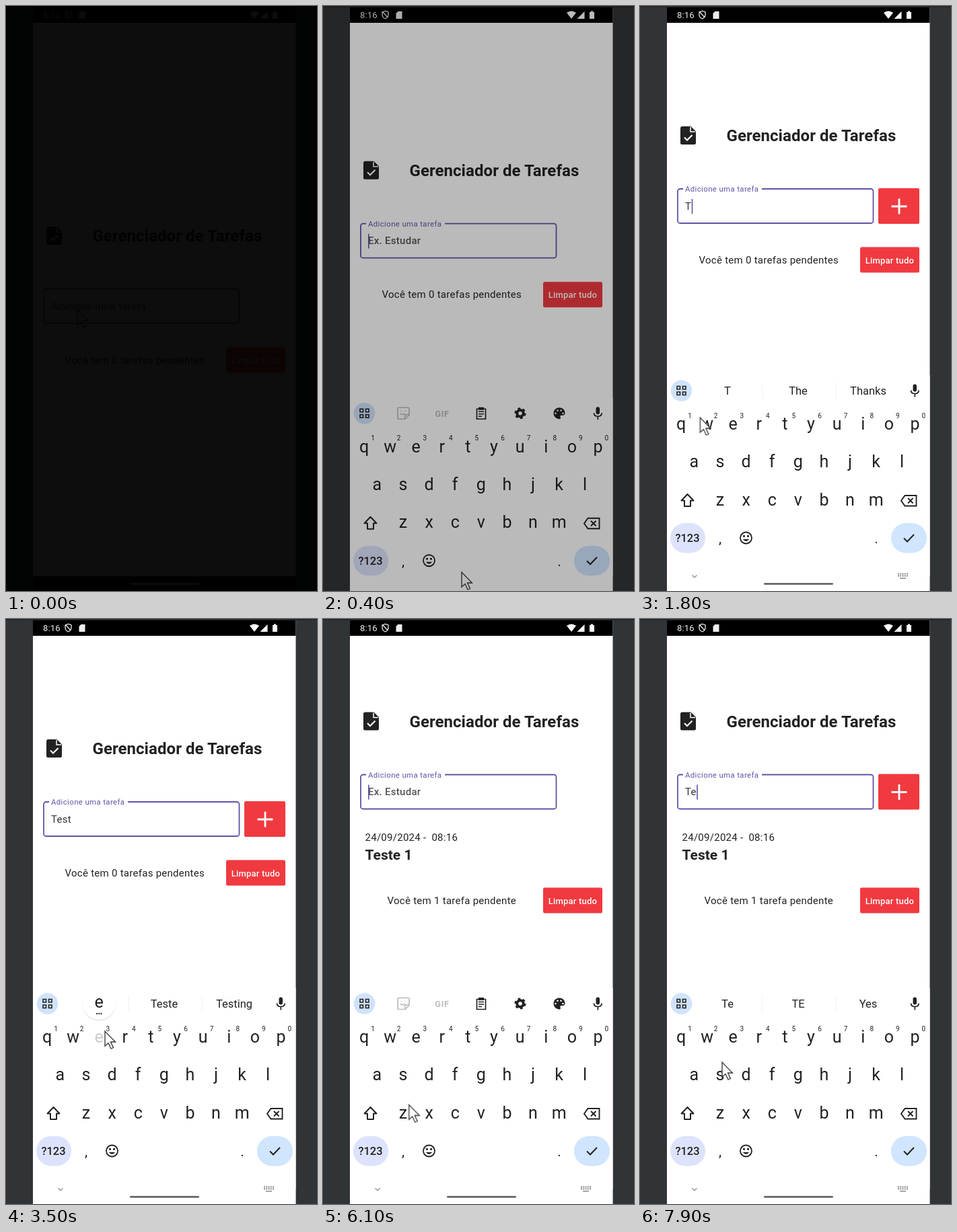
These frames come from a looping animation (462 px wide and 870 px high, 8 s). An HTML page:

```html
<!DOCTYPE html>
<html lang="pt">
<head>
<meta charset="utf-8">
<title>Gerenciador de Tarefas</title>
<style>
html, body { margin: 0; width: 100%; height: 100%; overflow: hidden; background: #313437; }
svg { display: block; width: 462px; height: 870px; }
text { font-family: Roboto, sans-serif; fill: #222; white-space: pre; }
.mid { text-anchor: middle; }
.line { fill: none; stroke: #222; stroke-width: 2; }
.hide { display: none; }
#fade, #page, #kb, #mouse { animation: 8s linear infinite; }
#fade { animation-name: fade; }
#page { animation-name: page; }
#kb { animation-name: kb; }
#mouse { animation-name: mouse; }
@keyframes fade { 0% { opacity: .95 } 7%, 100% { opacity: 0 } }
@keyframes page {
  0%, 2.5% { transform: translateY(149px) }
  3.75% { transform: translateY(95px) }
  5% { transform: translateY(52px) }
  6.25% { transform: translateY(23px) }
  7.5% { transform: translateY(6px) }
  8.75%, 100% { transform: translateY(0) }
}
@keyframes kb {
  0%, 1.25% { transform: translateY(325px) }
  2.5% { transform: translateY(190px) }
  3.75% { transform: translateY(92px) }
  5% { transform: translateY(34px) }
  6.25% { transform: translateY(8px) }
  7.5%, 100% { transform: translateY(0) }
}
@keyframes mouse {
  0%, 1.25% { transform: translate(106px, 452px) }
  5% { transform: translate(206px, 842px) }
  7.5% { transform: translate(206px, 824px) }
  11%, 12.5% { transform: translate(206px, 838px) }
  17%, 20% { transform: translate(213px, 617px) }
  22.5% { transform: translate(89px, 612px) }
  24.5%, 27% { transform: translate(141px, 615px) }
  29.5%, 31.5% { transform: translate(119px, 671px) }
  34.5%, 37% { transform: translate(214px, 616px) }
  40.5%, 44.5% { transform: translate(147px, 613px) }
  51%, 56% { transform: translate(188px, 796px) }
  58.5%, 60% { transform: translate(72px, 788px) }
  63%, 64.5% { transform: translate(61px, 616px) }
  69%, 71% { transform: translate(386px, 297px) }
  76.25% { transform: translate(128px, 722px) }
  78.75%, 87% { transform: translate(72px, 787px) }
  91%, 92.5% { transform: translate(214px, 616px) }
  94.8%, 96.5% { transform: translate(140px, 614px) }
  98.75% { transform: translate(122px, 659px) }
  100% { transform: translate(119px, 670px) }
}
</style>
</head>
<body>
<svg viewBox="0 0 462 870">
  <rect width="462" height="870" fill="#313437"/>
  <rect width="462" height="2" fill="#25282b"/>
  <rect x="40" y="2" width="390.500" height="868" fill="#fff"/>
  <g id="page">
    <g id="head">
      <path d="M63 179h12.500l7.500 7.500v17q0 2.500-2.500 2.500h-18q-2.500 0-2.500-2.500v-22q0-2.500 3-2.500z" fill="#222"/>
      <path d="M75 180v7h7" class="line" style="stroke:#fff;stroke-width:1.500"/>
      <path d="M66 195.500l4 4 7.500-7.500" class="line" style="stroke:#fff;stroke-width:2.200"/>
      <text x="128.500" y="201" font-size="24" font-weight="700" letter-spacing=".05">Gerenciador de Tarefas</text>
      <rect id="box" x="56" y="272" width="290.500" height="51" rx="3.500" fill="#fff" stroke-width="1.800"/>
      <rect id="gap" x="64" y="269" width="117" height="6" fill="#fff"/>
      <text id="label" x="67" letter-spacing=".38">Adicione uma tarefa</text>
      <text id="entry" x="67" y="302.500" font-size="15" letter-spacing=".27"></text>
      <rect id="caret" y="287" width="1.600" height="22" fill="#6252a8"/>
      <g id="add">
        <rect x="354" y="271" width="61" height="53" rx="2" fill="#f03a40"/>
        <path d="M373.500 298h23M385 286.500v23" class="line" style="stroke:#fff;stroke-width:2.800"/>
      </g>
    </g>
    <g id="task">
      <text x="62.500" y="329.500" font-size="15" letter-spacing=".27">24/09/2024 -  08:16</text>
      <text x="62.500" y="358" font-size="21" font-weight="700">Teste 1</text>
    </g>
    <g id="foot">
      <text id="count" class="mid" x="191.300" y="382.500" font-size="15" letter-spacing=".27"></text>
      <rect x="327" y="358.500" width="88" height="38" rx="2.500" fill="#f03a40"/>
      <text class="mid" x="371" y="382.500" font-size="13" font-weight="500" letter-spacing=".2" style="fill:#fff">Limpar tudo</text>
    </g>
  </g>
  <rect x="40" y="2" width="390.500" height="23" fill="#000"/>
  <text x="55" y="18" font-size="13" style="fill:#eee" letter-spacing=".2">8:16</text>
  <path d="M88 9l4.500-1.500L97 9v4q0 4-4.500 6Q88 17 88 13zM89 9l7 8" class="line" style="stroke:#eee;stroke-width:1.300"/>
  <path d="M111.500 8h6v11h-9v-8z" fill="#eee"/>
  <path d="M362 10q7-5 14 0l-7 9z" fill="#fff"/>
  <path d="M388.500 8v11h-11z" fill="#fff"/>
  <path d="M396 9h2V7.500h3V9h2v10h-7z" fill="#fff"/>
  <rect x="40" y="848" width="390.500" height="22" fill="#000"/>
  <rect x="184" y="858" width="103" height="3" rx="1.500" fill="#ddd"/>
  <g id="kb">
    <rect x="40" y="549" width="390.500" height="330" fill="#fff"/>
    <circle cx="61.500" cy="572" r="15.800" fill="#d0e3fc"/>
    <path d="M55 565.500h4.500v4.500H55zM63.500 565.500H68v4.500h-4.500zM55 574h4.500v4.500H55zM63.500 574H68v4.500h-4.500z" class="line" style="stroke-width:1.600"/>
    <g id="tools">
      <path d="M113 563.500h13q2 0 2 2v9l-6 6h-9q-2 0-2-2v-13q0-2 2-2zM122 580v-6h6M115 572q3 4 6 0M115.500 568.500h1M122 568.500h1" class="line" style="stroke:#bbb;stroke-width:1.700"/>
      <text class="mid" x="177" y="577" font-size="12.500" font-weight="700" letter-spacing=".6" style="fill:#bbb">GIF</text>
      <path d="M228.500 565.500h13v15h-13zM231 569.500h8M231 573h8M231 576.500h5" class="line" style="stroke-width:1.700"/>
      <path d="M231 563h8v4h-8z" fill="#222"/>
      <circle cx="293" cy="572" r="4.800" class="line" style="stroke-width:4"/>
      <circle cx="293" cy="572" r="7.300" class="line" style="stroke-width:2.600" stroke-dasharray="3.820"/>
      <path d="M351 563.500c-5 0-8.500 4-8.500 8.500s4 8.500 8.500 8.500c2.500 0 2-2 1.500-3s0-2.500 1.500-2.500h2.500c2 0 3-2 3-3.500 0-5-4-8-8.500-8z" fill="#222"/>
      <g fill="#fff"><circle cx="345.500" cy="572" r="1.300"/><circle cx="348.500" cy="567.800" r="1.300"/><circle cx="353.500" cy="567.800" r="1.300"/><circle cx="356.500" cy="572" r="1.300"/></g>
    </g>
    <g id="tips">
      <path d="M182 560v24M291 560v24" stroke="#f1f1f3"/>
      <text class="mid tip" x="130" y="578" font-size="16.500"></text>
      <text class="mid tip" x="235" y="578" font-size="16.500"></text>
      <text class="mid tip" x="339" y="578" font-size="16.500"></text>
    </g>
    <rect x="405.500" y="562.500" width="5.500" height="11" rx="2.700" fill="#222"/>
    <path d="M402.500 571.500q0 5 5.800 5t5.800-5M408.300 576.500v5" class="line" style="stroke-width:1.700"/>
    <g id="letters">
      <path d="M70.500 726l9 9.500h-4.500v8.500h-9v-8.500h-4.500z" class="line" stroke-linejoin="round"/>
      <circle cx="157.500" cy="791" r="8.500" class="line" style="stroke-width:1.800"/>
      <path d="M152.800 793q4.700 6 9.400 0z" fill="#222"/>
      <circle cx="154.500" cy="788.500" r="1.400"/><circle cx="160.500" cy="788.500" r="1.400"/>
    </g>
    <g id="symbols"></g>
    <path d="M393.500 728h17v15.500h-17l-5.500-7.700zM398 732l7.500 7.500M405.500 732l-7.500 7.500" class="line" style="stroke-width:1.900"/>
    <rect id="pill" x="45" y="769" width="52" height="44.500" rx="22" fill="#dde3fc"/>
    <text id="mode" class="mid" x="70.500" y="797" font-size="16.500" font-weight="500"></text>
    <text class="mid" x="119" y="799" font-size="21">,</text>
    <text class="mid" x="351" y="799" font-size="21">.</text>
    <rect x="373" y="769" width="53" height="44.500" rx="22" fill="#d0e5fe"/>
    <path d="M392 791.500l5 5 10-10.500" class="line"/>
    <path d="M77.500 846.500l3.500 3.500 3.500-3.500" class="line" style="stroke:#888;stroke-width:1.200"/>
    <path d="M383 844.500h15M383 847.500h15" class="line" style="stroke:#888;stroke-dasharray:2 1.250"/>
    <path d="M386 851h9" class="line" style="stroke:#888;stroke-width:1.500"/>
    <rect x="184" y="858" width="103" height="2.800" rx="1.400" fill="#666"/>
    <g id="pop">
      <circle r="25" cy="1.500" fill="#e3e3e6"/>
      <circle r="25" fill="#fff"/>
      <text id="popKey" class="mid" y="7" font-size="25"></text>
      <text class="mid" y="17" font-size="14" font-weight="700">…</text>
    </g>
  </g>
  <path id="mouse" d="M0 0v22l5-4.500 4 8.500 3.500-1.500-4-8.500h7z" fill="#fff" stroke="#333" stroke-width="1.300"/>
  <rect id="fade" width="462" height="870" fill="#000"/>
</svg>
<script>
const $ = id => document.getElementById(id);
const NS = 'http://www.w3.org/2000/svg';
const STEP = 38.6;
const keys = {};

function label(parent, x, y, str, size) {
  const el = document.createElementNS(NS, 'text');
  Object.entries({ x, y, 'font-size': size, class: 'mid' }).forEach(([k, v]) => el.setAttribute(k, v));
  el.textContent = str;
  return parent.appendChild(el);
}

function row(parent, chars, x0, y, size) {
  [...chars].forEach((c, i) => {
    const x = x0 + i * STEP;
    keys[c] = { el: label(parent, x, y, c, size), x, y };
  });
}

row($('letters'), 'qwertyuiop', 61, 630, 25);
row($('letters'), 'asdfghjkl', 80.3, 686, 25);
row($('letters'), 'zxcvbnm', 119, 742.5, 25);
[...'1234567890'].forEach((d, i) => label($('letters'), 74 + i * STEP, 612.5, d, 10));
row($('symbols'), '1234567890', 61, 630, 23);
row($('symbols'), '@#$_&-+()/', 61, 686, 22);
row($('symbols'), '*"\':;!?', 119, 742.5, 22);
label($('symbols'), 70.5, 741, '=\\<', 16);
label($('symbols'), 157.5, 797, '12 34', 11);

// [time, text, suggestions]
const edits = [
  [50, '', ''],
  [1600, 'T', 'T The Thanks'],
  [2150, 'Te', 'Te TE Yes'],
  [2500, 'Tes', 'Tes Test Yes'],
  [2950, 'Test', 'Test Teste Testing'],
  [3560, 'Teste', 'Teste Tester Tested'],
  [4280, 'Teste ', 'is and for'],
  [5130, 'Teste 1', '1 10 1st'],
  [5680, '', ''],
  [7400, 'T', 'T The Thanks'],
  [7700, 'Te', 'Te TE Yes']
];
// [release time, key]
const taps = [[1600, 't'], [2150, 'e'], [2500, 's'], [2950, 't'], [3560, 'e'], [5130, '1'], [7400, 't'], [7700, 'e']];
const SYMBOLS_ON = 4750, ADDED = 5680;

const show = (el, on) => el.classList.toggle('hide', !on);
const move = (el, x, y) => el.setAttribute('transform', `translate(${x} ${y})`);
const tips = document.querySelectorAll('.tip');

function draw(t) {
  const [at, text, words] = edits.filter(e => e[0] <= t).pop() || [0, '', ''];
  const focused = t >= 50;
  const rise = Math.min(1, Math.max(0, (t - 50) / 150));
  const added = t >= ADDED;
  const symbols = t >= SYMBOLS_ON && t < ADDED;

  move($('head'), 0, added ? -40.5 : 0);
  move($('foot'), 0, added ? 41 : 0);
  show($('task'), added);
  $('count').textContent = added ? 'Você tem 1 tarefa pendente' : 'Você tem 0 tarefas pendentes';

  $('box').setAttribute('stroke', focused ? '#6252a8' : '#777');
  show($('gap'), focused);
  $('label').setAttribute('y', 302.5 - 26.5 * rise);
  $('label').setAttribute('font-size', 15 - 3.6 * rise);
  $('label').style.fill = focused ? '#6252a8' : '#444';
  const entry = $('entry');
  entry.textContent = text || (rise === 1 ? 'Ex. Estudar' : '');
  entry.style.fill = text ? '#333' : '#555';
  entry.setAttribute('font-weight', text ? 400 : 500);
  $('caret').setAttribute('x', text ? 67.5 + entry.getComputedTextLength() : 67);
  show($('caret'), focused && (t - at) % 1000 < 500);
  show($('add'), text);

  show($('tools'), !words);
  show($('tips'), words);
  words.split(' ').forEach((w, i) => tips[i].textContent = w);
  show($('letters'), !symbols);
  show($('symbols'), symbols);
  $('mode').textContent = symbols ? 'ABC' : '?123';

  const tap = taps.find(([end]) => t >= end - 130 && t < end);
  Object.values(keys).forEach(k => k.el.style.fill = '');
  show($('pop'), tap);
  if (tap) {
    const k = keys[tap[1]];
    k.el.style.fill = '#ccc';
    $('popKey').textContent = tap[1];
    move($('pop'), k.x, k.y - 59);
  }
}

const start = performance.now();
function tick() {
  draw((performance.now() - start) % 8000);
  requestAnimationFrame(tick);
}
tick();
</script>
</body>
</html>
```
